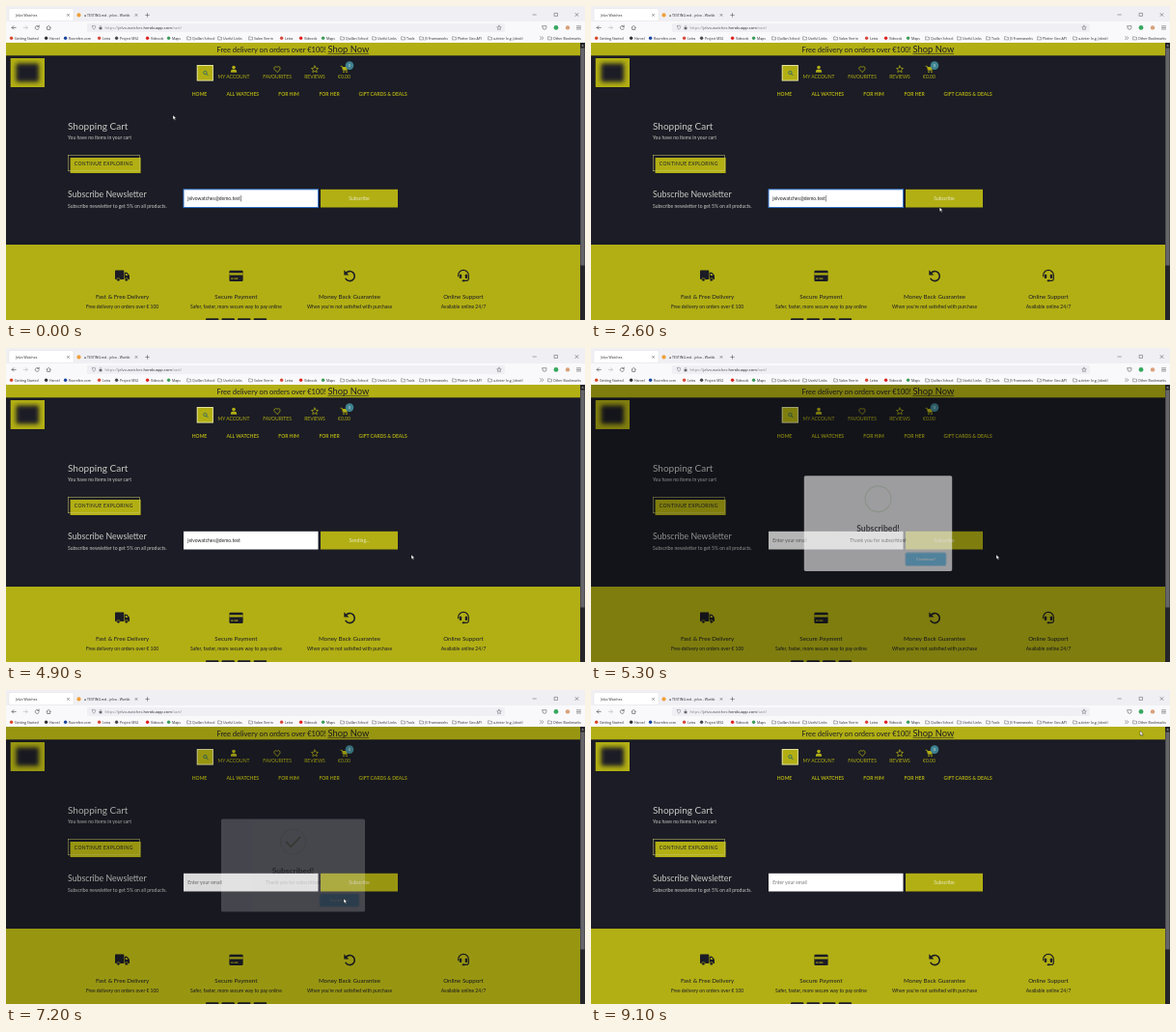
These frames come from a looping animation (600x325 px, 9.2 s). An HTML page:

```html
<!DOCTYPE html>
<html lang="en">
<head>
<meta charset="utf-8">
<title>Newsletter subscription</title>
<style>
html, body { margin: 0; width: 100%; height: 100%; overflow: hidden; background: #1b1c25; }
svg { display: block; width: 600px; height: 325px; font-family: Lato, sans-serif; }
.ui { font-family: "Open Sans", "Noto Sans", sans-serif; }
.mid { text-anchor: middle; }
.b { font-weight: 700; }
.line { fill: none; stroke-linecap: round; stroke-linejoin: round; }
</style>
</head>
<body>
<svg id="stage" viewBox="0 0 600 325"></svg>
<script>
const YELLOW = '#b2af14', DARK = '#1b1c25', PALE = '#c9c9c5', INK = '#3c3c44';
const LOOP = 9200, STEP = 100;
const SEND = 3500, OPEN = 5170, CLOSE = 7090;

const text = (x, y, s, size, fill, attrs = '') =>
  `<text x="${x}" y="${y}" font-size="${size}" fill="${fill}" ${attrs}>${s}</text>`;
const mid = (x, y, s, size, fill, cls = '') => text(x, y, s, size, fill, `class="mid ${cls}"`);
const rect = (x, y, w, h, fill, attrs = '') =>
  `<rect x="${x}" y="${y}" width="${w}" height="${h}" fill="${fill}" ${attrs}/>`;
const dot = (x, y, r, fill, attrs = '') => `<circle cx="${x}" cy="${y}" r="${r}" fill="${fill}" ${attrs}/>`;
const line = (d, color, width = .7, attrs = '') =>
  `<path class="line" d="${d}" stroke="${color}" stroke-width="${width}" ${attrs}/>`;
const shape = (d, fill) => `<path d="${d}" fill="${fill}"/>`;
const cross = (x, y, r) => line(`M${x - r} ${y - r}l${2 * r} ${2 * r}m0 ${-2 * r}l${-2 * r} ${2 * r}`, INK, .5);

function bookmarks() {
  const items = [
    [9, 'Getting Started', '#d9482b'], [45, 'Harvel', '#333'], [65, 'Roomfen.com', '#17449b'],
    [100, 'Letra', '#d9483b'], [118, 'Project MS2', '#4a4a50'], [150, 'Vidnook', '#e02020'],
    [172, 'Maps', '#3d9b58'], [193, 'Quillan School'], [225, 'Useful Links'],
    [257, 'Salon Verrin'], [289, 'Letra', '#d9483b'], [309, 'Vidnook', '#e02020'],
    [332, 'Maps', '#3d9b58'], [352, 'Quillan School'], [385, 'Useful Links'], [415, 'Tools'],
    [434, 'JS Frameworks'], [468, 'Plotter Geo API'], [505, 'a-tinter (e.g. Jobsit)'],
    [567, 'Other Bookmarks']
  ];
  return items.map(([x, label, color]) =>
    (color ? dot(x - 3.4, 33.2, 1.7, color)
           : line(`M${x - 5} 31.8h1.4l.5.6h1.6v2.5h-3.5z`, INK, .4)) +
    text(x, 34.6, label, 3.5, '#26262c')).join('') +
    line('M553.5 31.7l1.5 1.5-1.5 1.5m2-3l1.5 1.5-1.5 1.5', INK, .45);
}

function chrome() {
  return `<g class="ui">` +
    rect(0, 0, 600, 16.5, '#f0f0f4') + rect(0, 16, 600, 22, '#f9f9fb') +
    rect(3, 2.5, 67, 13, '#fff', 'rx="1.2" stroke="#d8d8de" stroke-width=".4"') +
    text(10, 10.8, 'Jelvo Watches', 3.5, '#26262c') + cross(64.5, 9.4, 1) +
    dot(75.5, 9.4, 2.1, '#f0a03a') +
    text(81, 10.8, '● TESTING.md - jelvo - Workb', 3.5, '#26262c') + cross(135, 9.4, 1) +
    line('M146.5 7.6v3.6m-1.8-1.8h3.6', INK, .5) +
    line('M546 9h3.4M568.5 7.4h3v3h-3z', INK, .45) + cross(591.5, 9, 1.5) +
    line('M10.2 22.4h-4m1.6-1.7l-1.7 1.7 1.7 1.7', INK, .6) +
    line('M18.2 22.4h4m-1.6-1.7l1.7 1.7-1.7 1.7', '#b5b5bb', .6) +
    line('M34 21.3a2 2 0 1 0 .3 1.6m-.1-2.8v1.4h-1.4', INK, .55) +
    line('M42 22.4l2.2-2.1 2.2 2.1m-3.7-.3v2.4h3v-2.4', INK, .55) +
    rect(84, 18, 433, 9, '#f0f0f4', 'rx="1.2"') +
    line('M89.5 20.8l1.6-.6 1.6.6q0 2.6-1.6 3.6-1.6-1-1.6-3.6z', '#66666e', .45) +
    rect(96.6, 22, 2.8, 2.3, '#66666e') + line('M97.2 22v-.7a.8.8 0 0 1 1.6 0v.7', '#66666e', .4) +
    text(102.5, 24, '<tspan fill="#85858c">https://</tspan>jelvo-watches.<tspan fill="#26262c">herokuapp.com</tspan><tspan fill="#85858c">/cart/</tspan>', 4, '#55555c') +
    line('M511 20.2l.7 1.5 1.6.2-1.2 1.1.3 1.6-1.4-.8-1.4.8.3-1.6-1.2-1.1 1.6-.2z', INK, .4) +
    line('M556 20.7h4v1.6a2 2 0 0 1-4 0z', INK, .5) +
    dot(570, 22.4, 2.4, '#38a860') + dot(582, 22.4, 2.2, '#d8a07a') +
    line('M591.5 20.8h4m-4 1.6h4m-4 1.6h4', INK, .5) +
    bookmarks() + '</g>';
}

function header() {
  const nav = [[200.5, 'HOME'], [245.3, 'ALL WATCHES'], [293, 'FOR HIM'], [335, 'FOR HER'], [390.6, 'GIFT CARDS &amp; DEALS']];
  const links = [[236, 'MY ACCOUNT'], [281, 'FAVOURITES'], [320, 'REVIEWS'], [350.5, '€0.00']];
  return rect(0, 38, 595, 13.3, YELLOW) +
    text(218.5, 48, 'Free delivery on orders over €100!', 7.5, DARK) +
    text(333.5, 48, 'Shop Now', 9.375, DARK) + rect(333.5, 48.9, 42.5, .6, DARK) +
    rect(4.7, 54, 35.3, 30, YELLOW) +
    rect(10.5, 59.5, 23.5, 19, DARK, 'filter="url(#soft)"') +
    rect(197.7, 61, 17.2, 16.6, '#e4e29a', 'filter="url(#glow)"') +
    rect(198.7, 62, 15.2, 14.6, YELLOW) +
    dot(206.4, 69, 1.7, 'none', 'stroke="#23646a" stroke-width=".8"') + line('M207.7 70.3l1.6 1.6', '#23646a', .9) +
    dot(236, 63.6, 1.8, YELLOW) + shape('M232.9 68.8v-1q0-2 2-2h2.2q2 0 2 2v1z', YELLOW) +
    line('M281 68.4l-2.8-2.8c-1.3-1.8 1-4.2 2.8-2.1 1.8-2.1 4.1.3 2.8 2.1z', YELLOW, .75) +
    line('M320 62l1.1 2.2 2.4.3-1.8 1.7.5 2.4-2.2-1.2-2.2 1.2.5-2.4-1.8-1.7 2.4-.3z', YELLOW, .75) +
    line('M347 62.3h1.3l1.1 4.4h4', YELLOW, .8) + shape('M348.5 62.9h5.8l-.9 3.2h-4.1z', YELLOW) +
    dot(350, 68.2, .8, YELLOW) + dot(353, 68.2, .8, YELLOW) +
    dot(356, 61.6, 4.3, '#3f8290') + mid(356, 63, '0', 4, '#d8e6e8') +
    links.map(([x, s]) => mid(x, 75, s, 5, YELLOW)).join('') +
    nav.map(([x, s]) => mid(x, 92.5, s, 5, YELLOW, 'b')).join('');
}

function cart() {
  return text(64, 127.7, 'Shopping Cart', 10, PALE) +
    text(64, 138, 'You have no items in your cart', 5, PALE) +
    rect(66.6, 157, 73, 16, YELLOW) +
    rect(64.5, 154.6, 73.8, 16.2, 'none', 'stroke="#d0ce70" stroke-width=".5"') +
    text(70.8, 165, 'CONTINUE EXPLORING', 5, DARK, 'letter-spacing=".35"') +
    text(64, 198.4, 'Subscribe Newsletter', 8.75, PALE) +
    text(64, 208.6, 'Subscribe newsletter to get 5% on all products.', 5, PALE) +
    rect(184, 189.8, 139.5, 18.7, '#fff', 'id="field"') +
    text(188.2, 201, '', 5, '#333', 'id="value"') +
    rect(246.3, 196, .45, 6.4, '#111', 'id="caret"') +
    rect(326, 189.8, 80, 18.7, YELLOW) +
    `<text id="send" class="mid" x="366" y="201" font-size="5" fill="#ecebc8"></text>`;
}

function footer() {
  const cols = [
    [120.6, 'Fast &amp; Free Delivery', 'Free delivery on orders over € 100'],
    [238.4, 'Secure Payment', 'Safer, faster, more secure way to pay online'],
    [356, 'Money Back Guarantee', "When you're not satisfied with purchase"],
    [474, 'Online Support', 'Available online 24/7']
  ];
  return rect(0, 247, 595, 78, YELLOW) +
    cols.map(([x, a, b]) => mid(x, 303, a, 6.25, DARK) + mid(x, 312.8, b, 5, DARK)).join('') +
    rect(113, 273.6, 9.2, 9.4, DARK, 'rx=".7"') + shape('M122.7 275.8h2.6l2.7 3v4.2h-5.3z', DARK) +
    shape('M123.8 276.9h1.1l1.6 2h-2.7z', YELLOW) +
    [116.4, 124.8].map(x => dot(x, 283.3, 1.7, DARK, `stroke="${YELLOW}" stroke-width=".6"`)).join('') +
    rect(231.4, 273.8, 14.2, 11.2, DARK, 'rx="1.2"') + rect(231.4, 276.3, 14.2, 2.2, YELLOW) +
    rect(233.1, 281.6, 2.4, 1, YELLOW) + rect(236.4, 281.6, 4, 1, YELLOW) +
    line('M352.2 276.6a5 5 0 1 1-.1 5.8', DARK, 1.6) + shape('M350.3 273.3v5.1h5.1z', DARK) +
    line('M468.6 279.8v-1a5.4 5.4 0 0 1 10.8 0v3.2q0 2.4-2.4 2.4h-3', DARK, 1.1) +
    rect(469.8, 277.8, 2.4, 4.2, DARK, 'rx=".8"') + rect(475.8, 277.8, 2.4, 4.2, DARK, 'rx=".8"') +
    rect(472.6, 283.6, 3, 1.7, DARK, 'rx=".8"') +
    [207, 223.5, 240, 256.7].map(x => rect(x, 323.2, 13.4, 5, DARK, 'rx="1"')).join('');
}

function modal() {
  return `<g id="modal">` + rect(223, 133.6, 149, 96, '#fff', 'rx="1.6"') +
    dot(297.5, 157, 13, 'none', 'stroke="#e2ecd6" stroke-width="1.1"') +
    line('M290.6 157.4l4.6 4.9 9.6-10', '#9dbb70', 1.6, 'id="check" pathLength="1" stroke-dasharray="1 2"') +
    mid(297.5, 189.6, 'Subscribed!', 8.4, '#595959', 'b') +
    mid(297.5, 200.6, 'Thank you for subscrition!', 5, '#5c5c5c') +
    rect(325, 211, 41, 13.2, '#7cd1f9', 'rx="1.5" stroke="#c4e4f5" stroke-width=".9"') +
    mid(345.5, 219.3, 'Continue!', 4.4, '#fff', 'b') + '</g>';
}

const stage = document.getElementById('stage');
stage.innerHTML = `<defs>
  <filter id="soft" x="-40%" y="-40%" width="180%" height="180%"><feGaussianBlur stdDeviation="2.3"/></filter>
  <filter id="glow" x="-40%" y="-40%" width="180%" height="180%"><feGaussianBlur stdDeviation=".7"/></filter>
</defs>` +
  rect(0, 38, 600, 287, DARK) + header() + cart() + footer() +
  rect(0, 38, 595, 287, '#000', 'id="shade"') + modal() +
  rect(595, 38, 5, 287, '#25252a') + rect(595.4, 43.5, 4.2, 225, '#66666a') +
  shape('M596.2 41.6l1.4-1.7 1.4 1.7z', '#aaa') + chrome() +
  `<path id="cursor" d="M0 0v4.6l1.1-1 .8 1.7.8-.4-.8-1.6h1.5z" fill="#fff" stroke="#111" stroke-width=".35"/>`;

const el = id => document.getElementById(id);
const clamp = x => Math.max(0, Math.min(1, x));
const ease = p => 1 - (1 - clamp(p)) ** 2.2;

// Piecewise path through [time, ...values], linear or smoothed
function track(keys, t, smooth) {
  let i = 1;
  while (i < keys.length - 1 && t > keys[i][0]) i++;
  const [t0, ...a] = keys[i - 1], [t1, ...b] = keys[i];
  let p = clamp((t - t0) / (t1 - t0));
  if (smooth) p = p * p * (3 - 2 * p);
  return a.map((v, k) => v + (b[k] - v) * p);
}

const PATH = [[0, 173, 113], [400, 173, 113], [1400, 164, 263], [1700, 164, 263], [2800, 380, 203],
  [3400, 380, 203], [3700, 420, 214], [6200, 420, 214], [6900, 350, 216], [7400, 350, 216],
  [8400, 569, 42.5], [LOOP, 569, 42.5]];
const POP = [[0, .5], [135, 1.05], [240, .95], [300, 1]];

function draw(t) {
  const sending = t >= SEND && t < OPEN, typed = t < OPEN, focused = t < SEND;
  const [x, y] = track(PATH, t, true);
  el('cursor').setAttribute('transform', `translate(${x} ${y})`);
  el('value').textContent = typed ? 'jelvowatches@demo.test' : 'Enter your email';
  el('value').setAttribute('fill', typed ? '#222' : '#777');
  el('field').setAttribute('stroke', focused ? '#2f6fc4' : 'none');
  el('caret').setAttribute('opacity', focused ? 1 : 0);
  if (focused) el('caret').setAttribute('x', 188.6 + el('value').getComputedTextLength());
  el('send').textContent = sending ? 'Sending...' : 'Subscribe';

  const shown = t < CLOSE ? ease((t - OPEN) / 300) : 1 - ease((t - CLOSE) / 300);
  const [scale] = track(POP, t - OPEN);
  el('shade').setAttribute('opacity', .4 * shown);
  el('modal').setAttribute('opacity', shown ** 1.6);
  el('modal').setAttribute('transform', `translate(297.5 181.6) scale(${scale}) translate(-297.5 -181.6)`);
  const drawn = clamp((t - OPEN - 350) / 350);
  el('check').setAttribute('stroke-dashoffset', 1 - drawn);
  el('check').setAttribute('opacity', drawn > 0 ? 1 : 0);
}

const start = performance.now();
function tick() {
  const t = (performance.now() - start) % LOOP;
  draw(Math.floor(t / STEP) * STEP);
  requestAnimationFrame(tick);
}
tick();
</script>
</body>
</html>
```
